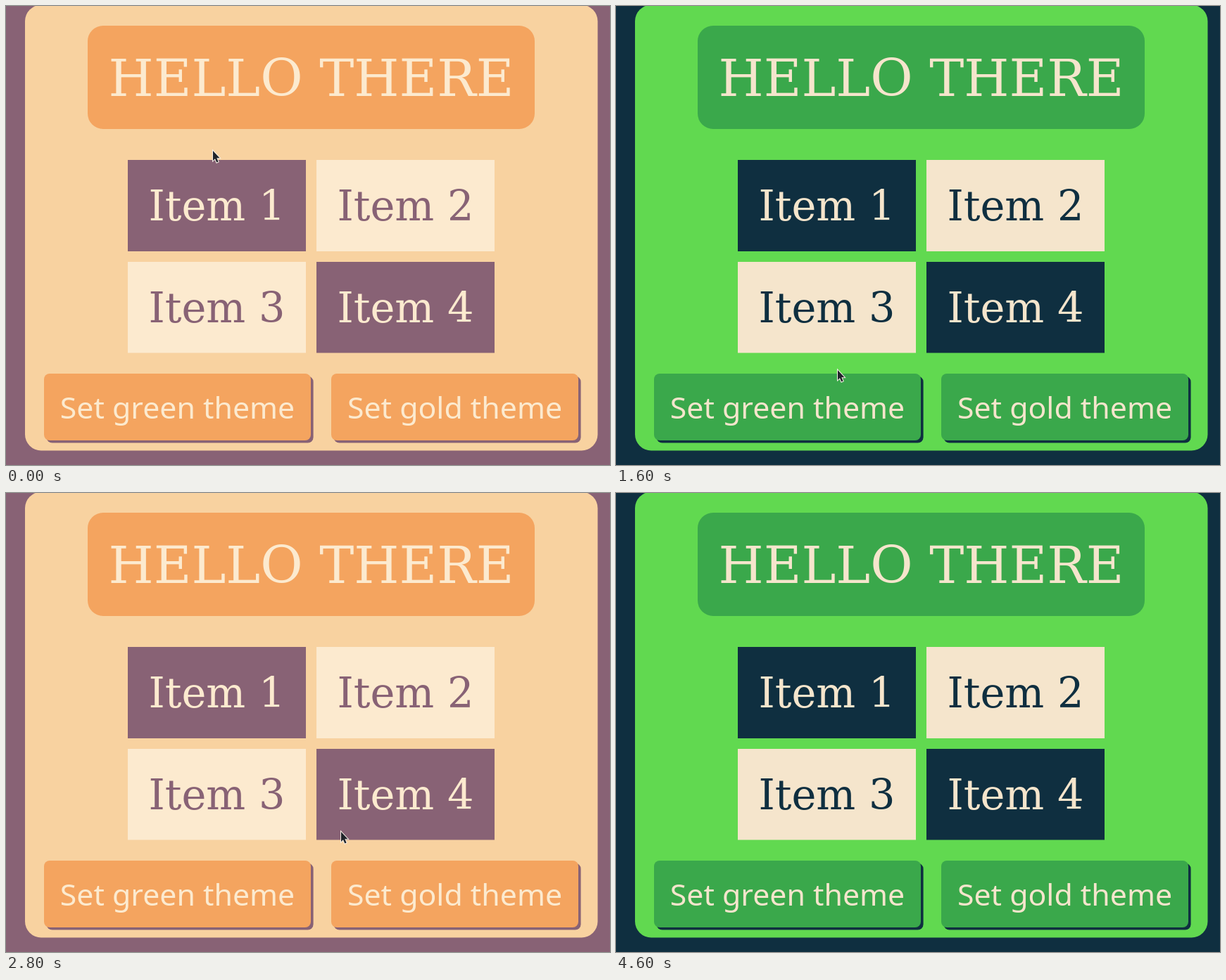
Write an HTML page with a canvas that moves like this. It is 858 by 653 pixels and loops after 5.4 s.

```html
<!DOCTYPE html>
<html lang="en">
<head>
<meta charset="utf-8">
<title>Theme switcher</title>
<style>
  html, body { margin: 0; width: 100%; height: 100%; overflow: hidden; }
  canvas { display: block; width: 858px; height: 653px; }
</style>
</head>
<body>
<canvas id="stage" width="858" height="653"></canvas>
<script>
const ctx = document.getElementById("stage").getContext("2d");
const LOOP = 5400;
const TICK = 100;

const GOLD = {
  dark: "#886275", panel: "#f8d2a0", accent: "#f4a45f",
  light: "#fceacf", hover: "#c67a57"
};
const GREEN = {
  dark: "#0f2f40", panel: "#61d950", accent: "#3aa84b",
  light: "#f5e5cc", hover: "#1a504a"
};

const BUTTONS = [
  { label: "Set green theme", x: 54, y: 523, w: 379, h: 95 },
  { label: "Set gold theme", x: 462, y: 523, w: 351, h: 95 }
];

// Pointer strokes: first tick, number of ticks, end point, optional curve control.
const HOME = [293, 204];
const MOVES = [
  { at: 200, ticks: 1, to: [291, 192] },
  { at: 300, ticks: 5, to: [255, 561] },
  { at: 800, ticks: 2, to: [248, 560] },
  { at: 1600, ticks: 5, to: [578, 579], via: [413, 421] },
  { at: 2600, ticks: 6, to: [371, 560], via: [475, 390] },
  { at: 3200, ticks: 1, to: [363, 559] },
  { at: 4200, ticks: 4, to: [34, 25] },
  { at: 4600, ticks: 1, to: [-60, -60] }
];

function pointerAt(t) {
  let from = HOME;
  for (const { at, ticks, to, via } of MOVES) {
    if (t < at) break;
    const u = Math.min(1, (Math.floor((t - at) / TICK) + 1) / ticks);
    const start = from;
    from = to.map((end, i) => {
      const mid = via ? via[i] : (start[i] + end) / 2;
      return (1 - u) ** 2 * start[i] + 2 * u * (1 - u) * mid + u * u * end;
    });
  }
  return from.map(Math.round);
}

function themeAt(t) {
  return (t >= 1200 && t < 2300) || t >= 3600 ? GREEN : GOLD;
}

function box(x, y, w, h, r, color) {
  ctx.fillStyle = color;
  ctx.beginPath();
  ctx.roundRect(x, y, w, h, r);
  ctx.fill();
}

function text(str, x, y, font, color) {
  ctx.font = font;
  ctx.fillStyle = color;
  ctx.textAlign = "center";
  ctx.fillText(str, x, y);
}

function drawItems(c) {
  for (let i = 0; i < 4; i++) {
    const x = 173 + (i % 2) * 268;
    const y = i < 2 ? 219 : 364;
    const isDark = i === 0 || i === 3;
    box(x, y, 253, i < 2 ? 130 : 129.5, 0, isDark ? c.dark : c.light);
    text("Item " + (i + 1), x + 126.5, y + 86, "59px 'DejaVu Serif', serif",
      isDark ? c.light : c.dark);
  }
}

function drawButton(b, c, [px, py]) {
  const over = px >= b.x && px < b.x + b.w && py >= b.y && py < b.y + b.h;
  box(b.x + 3.6, b.y + 3.6, b.w, b.h, 8, c.dark);
  box(b.x, b.y, b.w, b.h, 8, over ? c.hover : c.accent);
  text(b.label, b.x + b.w / 2, 587, "42.8px 'Noto Sans', sans-serif",
    over ? c.panel : c.light);
}

function drawPointer([x, y]) {
  ctx.save();
  ctx.translate(x + 1, y + 2);
  ctx.beginPath();
  ctx.moveTo(0, 0);
  ctx.lineTo(0, 14);
  ctx.lineTo(3, 11.3);
  ctx.lineTo(5.3, 16.6);
  ctx.lineTo(7.6, 15.6);
  ctx.lineTo(5.3, 10.3);
  ctx.lineTo(9.5, 10.3);
  ctx.closePath();
  ctx.lineWidth = 2;
  ctx.strokeStyle = "#f6eee6";
  ctx.stroke();
  ctx.fillStyle = "#20242a";
  ctx.fill();
  ctx.restore();
}

function draw() {
  const t = performance.now() % LOOP;
  const c = themeAt(t);
  const pointer = pointerAt(t);
  box(0, 0, 858, 653, 0, c.dark);
  box(27, -1.5, 813.5, 634, 23, c.panel);
  box(116, 28, 635, 147, 22, c.accent);
  text("HELLO THERE", 433.5, 128, "73.7px 'DejaVu Serif', serif", c.light);
  drawItems(c);
  for (const b of BUTTONS) drawButton(b, c, pointer);
  drawPointer(pointer);
  requestAnimationFrame(draw);
}
draw();
</script>
</body>
</html>
```
